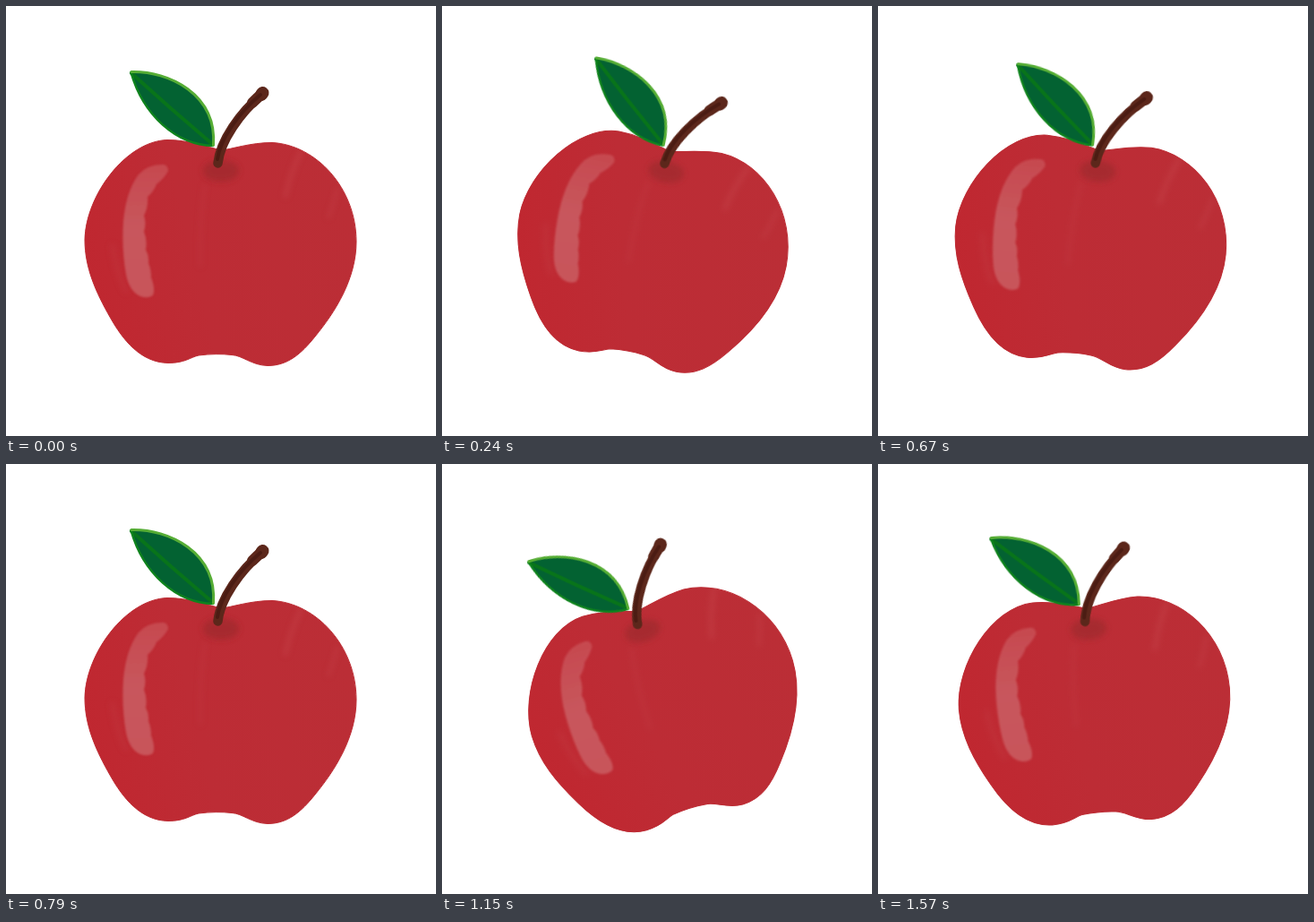
Write an HTML page that moves like this. It is 480x480 px and loops after 1630 ms.

```html
<!DOCTYPE html>
<html lang="en">
<head>
<meta charset="utf-8">
<title>Swaying apple</title>
<style>
  html, body { margin: 0; width: 100%; height: 100%; overflow: hidden; background: #fff; }
  svg { display: block; width: 100%; height: 100%; }
</style>
</head>
<body>
<svg viewBox="0 0 480 480" xmlns="http://www.w3.org/2000/svg">
  <defs>
    <filter id="soft" x="-20%" y="-20%" width="140%" height="140%"><feGaussianBlur stdDeviation="1.3"/></filter>
    <filter id="haze" x="-60%" y="-60%" width="220%" height="220%"><feGaussianBlur stdDeviation="3"/></filter>
    <linearGradient id="skin" x1="0" y1=".6" x2="1" y2=".4">
      <stop offset="0" stop-color="#c02730"/>
      <stop offset=".4" stop-color="#bd2c35"/>
      <stop offset="1" stop-color="#bb2e36"/>
    </linearGradient>
    <linearGradient id="shine" x1="0" y1="0" x2="0" y2="1">
      <stop offset="0" stop-color="#c6494f"/>
      <stop offset=".5" stop-color="#c8575d"/>
      <stop offset="1" stop-color="#c8545a"/>
    </linearGradient>
    <path id="body" d="M240 161 C252 160 272 152.500 297 152.500 C346 155 391 203 391 263 C391 304 368 341 345 369
      C329 389 314 401.500 292 401.500 C274 401 264 390 252 389.500 Q235 387.500 215 390 C206 392 200 398.500 181 398.500
      C150 398 130 372 116.500 348 C100 319 88 292 88 261 C89 211 134 151 180 149.500 C204 149.500 224 157 240 161Z"/>
    <clipPath id="inside"><use href="#body"/></clipPath>
  </defs>
  <g id="apple">
    <use href="#body" fill="url(#skin)" stroke="#bd2c34"/>
    <g clip-path="url(#inside)" fill="none" filter="url(#haze)" stroke="#c8474e" stroke-linecap="round" opacity=".4">
      <path d="M329 163 Q318 185 312 212" stroke-width="6"/>
      <path d="M370 204 Q366 220 360 236" stroke-width="4"/>
      <path d="M222 200 Q216 240 217 290" stroke-width="5" opacity=".5"/>
      <path d="M119 268 Q124 300 134 318" stroke-width="7" opacity=".5"/>
    </g>
    <path filter="url(#soft)" fill="url(#shine)" d="M176 177 Q159 176 148 188 Q134 207 131 240 Q129 272 134 300
      Q138 319 150 324 Q158 327 164 323 Q167 316 162 303 Q162 294 159 287 Q160 279 156 272 Q158 261 154 252
      Q157 242 154 234 Q159 224 158 213 Q165 207 168 199 Q177 192 181 184 Q181 178 176 177Z"/>
    <ellipse cx="240" cy="184" rx="20" ry="12" fill="#a32a2e" opacity=".85" filter="url(#haze)"/>
    <path fill="#036232" d="M139 73 C182 72 236 98 232 157 C190 155 152 122 139 73Z"/>
    <g fill="none" stroke-linecap="round">
      <path d="M140 75 Q184 115 229 153" stroke="#08741a" stroke-width="4"/>
      <path d="M139.500 74 C153 122 190 155 231 156" stroke="#0f831d" stroke-width="2.500"/>
      <path d="M140 73.500 C182 72.500 235.500 98.500 231.500 155.500" stroke="#56ad35" stroke-width="3"/>
      <path d="M236.500 175.500 C239 151 261 119 287 97.500" stroke="#5c271b" stroke-width="10.500"/>
      <path d="M275 108 Q281 102 286.500 97.500" stroke="#5c271b" stroke-width="12"/>
      <path d="M285 99 L286.500 97" stroke="#5c271b" stroke-width="14"/>
      <path d="M236 171 C239 148 260 119 284 99" stroke="#4b1c13" stroke-width="4"/>
    </g>
  </g>
</svg>
<script>
  const LOOP = 1630, STEP = 60;
  const apple = document.getElementById('apple');

  // [step, tilt in degrees]
  const sway = [[0, 0], [4, 10.6], [5, 12.6], [6.5, 13.9], [8, 12.7], [9, 10.6], [13, 0],
    [16, -9.8], [19, -16.5], [20.3, -17.1], [23, -12.8], [26, -4.85], [27, 0]];

  // the sway rests for a moment at its right end
  function stepAt(t) {
    if (t < 490) return Math.min(6, Math.floor(t / STEP));
    return 8 + Math.floor((t - 490) / STEP);
  }

  function slope(i) {
    const a = sway[Math.max(0, i - 1)], b = sway[Math.min(sway.length - 1, i + 1)];
    return (b[1] - a[1]) / (b[0] - a[0]);
  }

  function tilt(k) {
    let i = 0;
    while (i < sway.length - 2 && k >= sway[i + 1][0]) i++;
    const [x0, y0] = sway[i], [x1, y1] = sway[i + 1];
    const h = x1 - x0, s = (k - x0) / h, r = 1 - s;
    return r * r * ((1 + 2 * s) * y0 + s * h * slope(i))
      + s * s * ((1 + 2 * r) * y1 - r * h * slope(i + 1));
  }

  function draw(t) {
    apple.setAttribute('transform', `rotate(${tilt(stepAt(t)).toFixed(3)} 240 240)`);
  }

  const start = performance.now();
  function tick() {
    draw((performance.now() - start) % LOOP);
    requestAnimationFrame(tick);
  }
  draw(0);
  requestAnimationFrame(tick);
</script>
</body>
</html>
```
